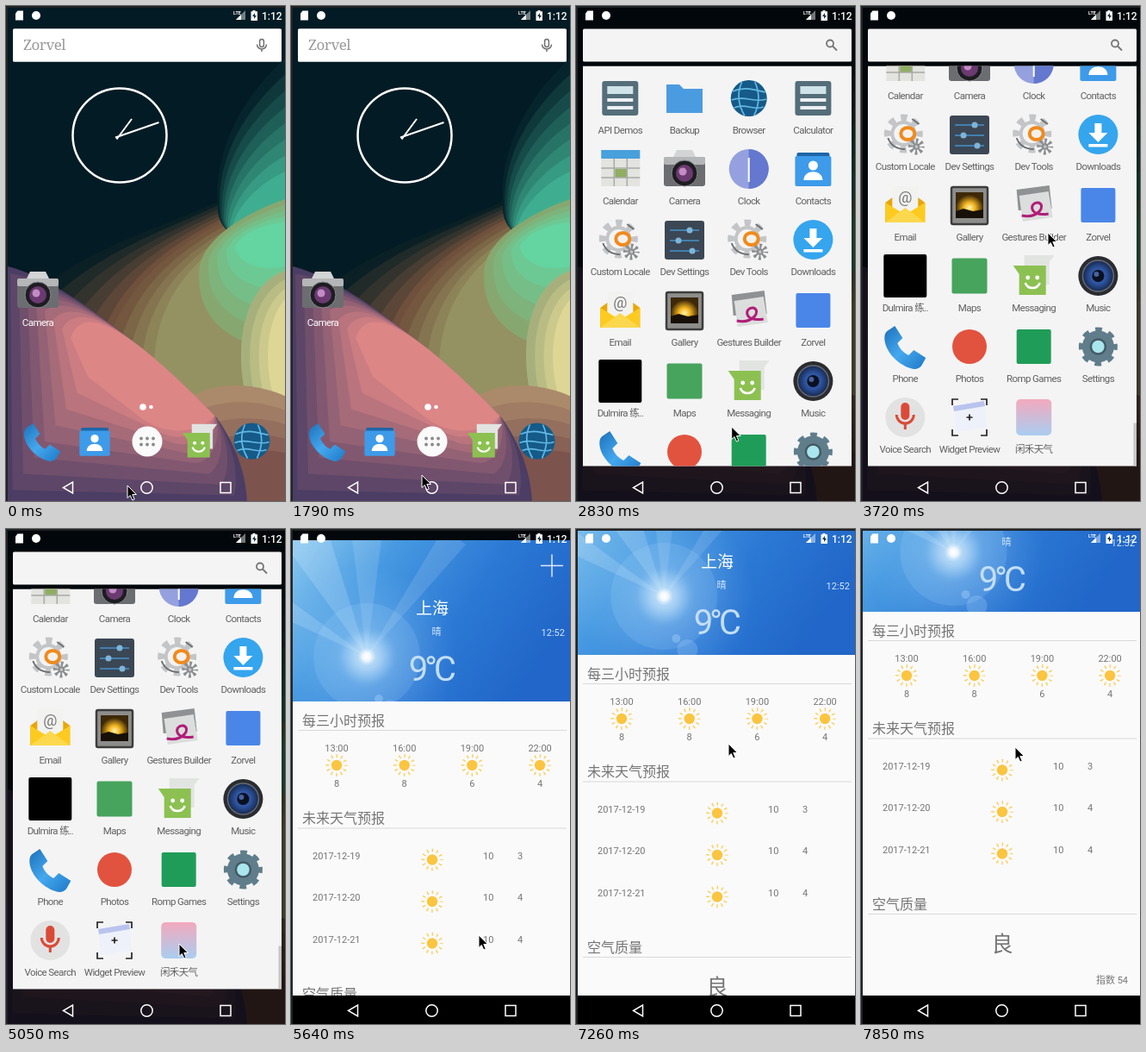
Recreate the animation shown at these times as an HTML page. Size 324 by 574 pixels, loop 7.99 s.

```html
<!DOCTYPE html>
<html lang="zh-CN">
<head>
<meta charset="utf-8">
<title>Weather app demo</title>
<style>
html, body { margin: 0; width: 100%; height: 100%; overflow: hidden; background: #031b24; }
svg { display: block; width: 100vw; height: 100vh; }
text { font-family: Roboto, "Noto Sans CJK SC", "Noto Sans CJK", sans-serif; }
.label { font-size: 11.5px; letter-spacing: -.6px; text-anchor: middle; }
.line { fill: none; stroke: #fff; }
</style>
</head>
<body>
<svg viewBox="0 0 324 574" preserveAspectRatio="none">
  <defs>
    <linearGradient id="sky" x1="0" y1=".1" x2="1" y2=".5">
      <stop offset="0" stop-color="#85c5ef"/><stop offset=".3" stop-color="#4699e1"/>
      <stop offset=".65" stop-color="#2b78d4"/><stop offset="1" stop-color="#2166c8"/>
    </linearGradient>
    <radialGradient id="glow">
      <stop offset="0" stop-color="#fff"/><stop offset=".13" stop-color="#fff" stop-opacity=".85"/>
      <stop offset=".3" stop-color="#c5e8ff" stop-opacity=".45"/><stop offset="1" stop-color="#9fd4fb" stop-opacity="0"/>
    </radialGradient>
    <radialGradient id="sunset" cy=".6">
      <stop offset="0" stop-color="#fff6b0"/><stop offset=".4" stop-color="#f2b521"/><stop offset="1" stop-color="#3d2807"/>
    </radialGradient>
    <linearGradient id="dusk" x2="0" y2="1">
      <stop offset="0" stop-color="#f3a9bd"/><stop offset="1" stop-color="#a9cdf0"/>
    </linearGradient>
    <linearGradient id="handset" x2="1" y2="1">
      <stop offset="0" stop-color="#1c70b8"/><stop offset=".5" stop-color="#45a8ef"/><stop offset="1" stop-color="#1d78c6"/>
    </linearGradient>
    <radialGradient id="cone">
      <stop offset="0" stop-color="#0c1430"/><stop offset=".45" stop-color="#3159a8"/><stop offset="1" stop-color="#16284f"/>
    </radialGradient>
    <clipPath id="panelBox"><rect x="8" y="69.5" width="312" height="464"/></clipPath>
    <clipPath id="reveal"><circle id="hole" cx="163.5"/></clipPath>
    <clipPath id="appBox"><rect x="2" y="2" width="322" height="539"/></clipPath>
    <clipPath id="skyBox"><rect x="2" width="322" height="187"/></clipPath>
  </defs>

  <rect width="324" height="574" fill="#031b24"/>
  <g id="wall"></g>
  <rect id="dim" width="324" height="574"/>

  <g id="home"></g>

  <rect x="8" y="26.5" width="312" height="38" rx="1.5" fill="#f4f4f4"/>
  <g id="brand">
    <rect x="8" y="26.5" width="312" height="38" rx="1.5" fill="#fff"/>
    <text x="20" y="51" font-size="17" fill="#9a9a9a" style="font-family:'Noto Serif','Liberation Serif',serif;letter-spacing:-.5px">Zorvel</text>
    <g fill="none" stroke="#707070" stroke-width="1.5">
      <rect x="294.6" y="38.5" width="4.8" height="9" rx="2.4"/><path d="M291.5 44.5a5.5 5.5 0 0 0 11 0M297 50v3"/>
    </g>
  </g>
  <g id="lens" fill="none" stroke="#757575" stroke-width="1.8"><circle cx="295" cy="43.5" r="4"/><path d="M298 46.5l5 5"/></g>

  <g clip-path="url(#panelBox)"><g clip-path="url(#reveal)">
    <rect id="panel" x="8" width="312" height="465" fill="#f4f4f4"/>
    <g id="list"></g>
    <rect id="thumb" x="316.5" width="3.5" height="50" fill="#c6c6c6"/>
  </g></g>

  <g id="app">
    <rect y="540" width="324" height="34"/>
    <g clip-path="url(#appBox)"><g id="page">
      <rect y="187" width="324" height="640" fill="#fafafa"/>
      <g clip-path="url(#skyBox)">
        <rect width="324" height="187" fill="url(#sky)"/>
        <g id="flare">
          <path fill="#fff" opacity=".16" d="M0 0L-110-150-50-160zM0 0L-130-60-130-95z"/>
          <path fill="#fff" opacity=".12" d="M0 0L-20-160 20-160zM0 0L90-150 115-130z"/>
          <circle r="105" fill="url(#glow)" opacity=".55"/>
          <circle r="62" fill="#bfe4ff" opacity=".13"/>
          <circle r="36" fill="url(#glow)"/>
          <circle cx="14" cy="49" r="5" fill="#bfe4ff" opacity=".3"/>
          <circle cx="27" cy="62" r="12" fill="#bfe4ff" opacity=".22"/>
        </g>
      </g>
      <path class="line" opacity=".85" stroke-width="1.5" d="M290 29.5h26M303 16.5v26"/>
      <g id="report"></g>
    </g></g>
  </g>

  <g fill="#fff">
    <path d="M13.5 5.5h6.5v11h-9v-8z"/>
    <circle cx="35" cy="11" r="5"/>
    <path d="M278 5v11h-11z" opacity=".45"/><path d="M273 10v6h-6z"/>
    <text x="264" y="10" font-size="5.5" font-weight="700">LTE</text>
    <path d="M286.5 5h3v1.3h2.5v10.7h-7.5v-10.7h2z"/>
    <path d="M289 8l-3 4h2v3l3-4h-2z" fill="#17303f"/>
    <text x="297" y="15.5" font-size="12" font-weight="500">1:12</text>
  </g>
  <g class="line" stroke-width="1.5">
    <path d="M77.5 552v13L66.5 558.5z"/><circle cx="163.5" cy="558.5" r="6.7"/><rect x="249" y="552.5" width="12" height="12"/>
  </g>
  <path d="M0 0H324V2H2V574H0z" fill="#202326"/>
  <path id="cursor" d="M0 0V14.5l3.3-3 2.5 5.5 2.4-1-2.4-5.5H10.5z" fill="#000" stroke="#fff"/>
</svg>

<script>
const $ = id => document.getElementById(id);
const mix = (a, b, p) => a + (b - a) * p;
const circle = (x, y, r, fill, more = '') => `<circle cx="${x}" cy="${y}" r="${r}" fill="${fill}" ${more}/>`;
const rect = (x, y, w, h, fill, more = '') => `<rect x="${x}" y="${y}" width="${w}" height="${h}" fill="${fill}" ${more}/>`;
const path = (d, fill, more = '') => `<path d="${d}" fill="${fill}" ${more}/>`;
const stroke = (d, color, w) => path(d, 'none', `stroke="${color}" stroke-width="${w}"`);
const at = (x, y, art, scale = 1) => `<g transform="translate(${x} ${y}) scale(${scale})">${art}</g>`;
const label = (x, y, s, fill) => `<text class="label" x="${x}" y="${y + 4}" fill="${fill}">${s}</text>`;
const text = (x, y, s, size = 11, fill = '#757575', anchor = 'middle', more = '') =>
  `<text x="${x}" y="${y + size * .36}" font-size="${size}" fill="${fill}" text-anchor="${anchor}" ${more}>${s}</text>`;
const square = (size, fill) => rect(-size / 2, -size / 2, size, size, fill, 'rx="2"');

// Flat bands that blend one outline and colour into another
function bands(count, outer, outerColor, inner, innerColor) {
  const number = /-?\d+/g, target = inner.match(number);
  const rgb = hex => hex.match(/\w\w/g).map(h => parseInt(h, 16));
  const from = rgb(outerColor), to = rgb(innerColor);
  let art = '';
  for (let k = 0; k < count; k++) {
    const p = k / (count - 1);
    let i = 0;
    const d = outer.replace(number, v => mix(+v, +target[i++], p).toFixed(1));
    art += path(d, `rgb(${from.map((v, c) => Math.round(mix(v, to[c], p)))})`);
  }
  return art;
}
$('wall').innerHTML =
  bands(6, 'M 20 345 C 90 280 170 262 250 225 L 330 300 L 330 580 L 60 580 Z', '#0b2024',
    'M 105 400 C 125 325 185 278 255 245 L 330 300 L 330 580 L 150 580 Z', '#6f503c') +
  bands(5, 'M 115 400 C 135 325 190 282 256 248 L 330 300 L 330 580 L 150 580 Z', '#73573e',
    'M 172 410 C 176 345 210 300 262 268 L 330 300 L 330 580 L 200 580 Z', '#949262') +
  bands(8, 'M 330 55 C 280 100 240 160 246 235 C 246 250 255 262 270 270 L 330 270 Z', '#06242c',
    'M 330 190 C 300 200 268 230 262 258 C 262 268 270 275 280 275 L 330 275 Z', '#3fae90') +
  bands(5, 'M 225 300 C 235 262 290 235 330 222 L 330 400 C 290 400 215 380 225 300 Z', '#86a870',
    'M 266 278 C 275 262 300 252 330 250 L 330 300 C 300 310 268 300 266 278 Z', '#64d4a0') +
  bands(4, 'M 330 305 C 285 315 255 380 285 480 L 330 500 Z', '#a7b07c',
    'M 330 335 C 308 350 296 400 310 450 L 330 460 Z', '#ded695') +
  bands(5, 'M 190 470 C 240 425 300 440 330 455 L 330 580 L 190 580 Z', '#ab8a6b',
    'M 190 545 C 240 515 300 510 330 520 L 330 580 L 190 580 Z', '#7d534e') +
  bands(9, 'M -5 300 C 60 315 130 370 245 478 C 275 520 280 560 280 580 L -5 580 Z', '#4b3d63',
    'M 75 385 C 90 340 150 380 242 475 C 228 494 190 500 160 480 L 95 430 Z', '#dd8686');

// Ring of evenly spaced bars, used for gear teeth and sun rays
function spokes(r, count, len, share, color) {
  const step = 2 * Math.PI * r / count;
  return circle(0, 0, r, 'none', `stroke="${color}" stroke-width="${len}" stroke-dasharray="${step * share} ${step * (1 - share)}" stroke-dashoffset="${step * share / 2}"`);
}
const gear = (r, color, width) => spokes(r, 8, 9, .5, color) +
  circle(0, 0, r - 5, 'none', `stroke="${color}" stroke-width="${width}"`);
const sun = circle(0, 0, 6.2, '#fbc540') + spokes(10.8, 12, 4, .25, '#fbce5c');

const icons = {
  chart: rect(-21, -20, 42, 40, '#546e7a', 'rx="3"') + rect(-15, -14, 30, 9, '#cfe3e8') + stroke('M-15 2H15M-15 11H15', '#eceff1', 4),
  folder: path('M-21-16h15l5 5h22v28h-42z', '#4b9be0'),
  globe: circle(0, 0, 21, '#155a88') + stroke('M-19-8C-5-14 8-10 19-7M-20 2C-6-4 8 6 20 1M-17 11C-4 5 6 15 17 10M-8-19C-14-6-12 8-5 20M7-19C13-6 12 8 6 20', '#62b8e3', 1.7),
  calendar: rect(-22, -22, 45, 42, '#e3e3e0') + rect(-22, -22, 45, 10, '#48a0dc') + rect(-6, 0, 14, 10, '#90ae62') +
    stroke('M-22-1H23M-22 10H23M-7-12V20M8-12V20', '#a9aaa6', 1.5),
  camera: rect(-24, -14, 48, 34, '#6b6d70', 'rx="3"') + path('M-13-14l4-8H9l4 8z', '#d2d4d5') + rect(-24, -14, 48, 9, '#b4b6b8', 'rx="2"') +
    circle(0, 5, 15, '#1e1d22', 'stroke="#88898c"') + circle(0, 5, 10, '#6a3a70') + circle(-2, 3, 4.5, '#c38cc4'),
  clock: circle(0, 0, 23, '#94a1de') + path('M0-23A23 23 0 0 1 0 23z', '#6378ce') + stroke('M0-13V0V15', '#fff', 2),
  contacts: rect(-19, -19, 38, 9, '#1d66a8', 'rx="2"') + rect(-21, -15, 42, 35, '#3d9be9', 'rx="2"') + circle(0, -4, 5.5, '#fff') + path('M-11 13c0-13 22-13 22 0z', '#fff'),
  tool: at(-2, -1, gear(18, '#c3c5c7', 4)) + stroke('M-20 4C-17 12-10 17 0 17M8-18L16-12', '#6d6f71', 2) + at(13, 14, gear(9, '#8b8d8f', 3), .7) +
    `<ellipse cx="3" cy="-1" rx="8" ry="7" fill="#f4f1ec" stroke="#f08a1c" stroke-width="4"/>`,
  sliders: rect(-23, -22, 46, 45, '#3b4754', 'rx="3"') + stroke('M-17-11H17M-17 1H17M-17 13H17', '#4593cc', 1.6) +
    circle(6, -11, 3.5, '#7fb4d8') + circle(-7, 1, 3.5, '#7fb4d8') + circle(9, 13, 3.5, '#7fb4d8'),
  download: circle(0, 0, 23, '#35a5ee') + path('M-4-13h8v11h7L0 9-11-2h7z', '#fff') + rect(-11, 11, 22, 3.5, '#fff'),
  email: path('M-23-3L0-20 23-3V20H-23z', '#e8a60d') + rect(-15, -22, 30, 30, '#f2f2f0') + text(0, -9, '@', 18, '#777') +
    path('M-23-3L0 11 23-3V20H-23z', '#fdcb1f') + path('M-23 20L0 3 23 20z', '#fbd84e'),
  gallery: rect(-21, -21, 42, 43, '#8d8d8b', 'rx="2" stroke="#3c3c3c" stroke-width="2.5"') + rect(-16, -15, 32, 30, 'url(#sunset)') + path('M-16 7L-7 4 4 7 16 5V15H-16z', '#171008'),
  gesture: path('M-20-18L18-23 21 4-18 6z', '#8f9193') + path('M-17-11L17-16 22 14-13 19z', '#dcdddd') +
    stroke('M-14 12C5 16 15 0 5-3-5-4-7 14 17 10', '#b01d78', 3),
  envelope: square(40, '#4a86e8'),
  dark: square(50, '#000'),
  map: square(41, '#47a45c'),
  message: path('M-11-24H24L18-16V10H-11z', '#e2e4e2') + path('M-24-12H14V22H-17V-2z', '#8cc152') +
    circle(-7, 2, 2.4, '#fff') + circle(4, 2, 2.4, '#fff') + stroke('M-10 8C-7 16 4 16 7 8', '#fff', 2.6),
  music: circle(0, 0, 23, '#2b2c30') + circle(0, 0, 18, 'url(#cone)', 'stroke="#666a72" stroke-width="1.5"') + circle(0, 0, 7, '#0b1020') + circle(-2, -2, 3, '#47639f'),
  phone: path('M-21-18l9-6 9 14-6 6c3 7 7 11 13 14l6-6 14 9-5 9c-3 4-8 5-13 3C-10 20-24 4-24-10c0-4 1-6 3-8z', 'url(#handset)'),
  photos: circle(0, 0, 20, '#e2533f'),
  games: square(40, '#1f9d58'),
  settings: gear(18, '#607d8b', 11) + circle(0, 0, 8.5, '#a9e6ee', 'stroke="#455a64" stroke-width="2.5"'),
  voice: circle(0, 0, 23, '#e2e2e2') + rect(-5, -17, 10, 20, '#d94a38', 'rx="5"') + stroke('M-10-3a10 10 0 0 0 20 0M0 7V14', '#d94a38', 3),
  widget: path('M-19-13L17-19 20 12-16 17z', '#eef1fa') + path('M-19-13L17-19 18-13-18-7z', '#b9c4ee') +
    stroke('M-20-14V-21H-13M13-21H20V-14M20 14V21H13M-13 21H-20V14M-3.5 0H3.5M0-3.5V3.5', '#222', 1.7),
  weather: rect(-20.5, -21, 41, 42, 'url(#dusk)', 'rx="5"'),
};

const apps = [
  ['chart', 'API Demos'], ['folder', 'Backup'], ['globe', 'Browser'], ['chart', 'Calculator'],
  ['calendar', 'Calendar'], ['camera', 'Camera'], ['clock', 'Clock'], ['contacts', 'Contacts'],
  ['tool', 'Custom Locale'], ['sliders', 'Dev Settings'], ['tool', 'Dev Tools'], ['download', 'Downloads'],
  ['email', 'Email'], ['gallery', 'Gallery'], ['gesture', 'Gestures Builder'], ['envelope', 'Zorvel'],
  ['dark', 'Dulmira 练..'], ['map', 'Maps'], ['message', 'Messaging'], ['music', 'Music'],
  ['phone', 'Phone'], ['photos', 'Photos'], ['games', 'Romp Games'], ['settings', 'Settings'],
  ['voice', 'Voice Search'], ['widget', 'Widget Preview'], ['weather', '闲禾天气'],
];
$('list').innerHTML = apps.map(([icon, name], i) => {
  const x = 51.3 + i % 4 * 74.7, y = 107 + Math.floor(i / 4) * 82;
  return at(x, y, icons[icon]) + label(x, y + 37, name, '#606060');
}).join('');

const dots = [0, 1, 2, 3, 4, 5].map(i => circle(i % 3 * 7 - 7, i < 3 ? -3.5 : 3.5, 1.9, '#8a8a8a')).join('');
$('home').innerHTML =
  circle(132, 150, 54.5, 'none', 'class="line" stroke-width="2.5"') + stroke('M128.5 154.5L146 131M127 152.5L177.5 135', '#fff', 2) +
  at(37, 330, icons.camera) + label(37, 367, 'Camera', '#fff') +
  circle(159, 465, 3.8, '#fff') + circle(168.5, 465, 2.3, '#fff') +
  at(42, 505, icons.phone, .88) + at(103, 505, icons.contacts, .84) +
  at(164, 505, circle(0, 0, 17.5, '#fafafa') + dots) +
  at(225, 505, icons.message, .84) + at(285.5, 504.5, icons.globe);

// Positions are measured from the top of the page; the sky is 187 high
const sky = 187;
const rule = y => rect(8, sky + y, 312, 1, '#d9d9d9');
const title = (y, s) => text(13, sky + y, s, 16, '#757575', 'start') + rule(y + 11);
const hours = [['13:00', 8], ['16:00', 8], ['19:00', 6], ['22:00', 4]];
const days = [['2017-12-19', 3], ['2017-12-20', 4], ['2017-12-21', 4]];
$('report').innerHTML =
  text(164, sky - 108, '上海', 19, '#fff') + text(169, sky - 81, '晴', 11, '#d5e8fa') +
  text(318, sky - 80, '12:52', 11, '#d5e8fa', 'end') +
  text(163, sky - 38, '9℃', 40, '#c3def7', 'middle', 'letter-spacing="-2.5"') +
  title(22, '每三小时预报') +
  hours.map(([time, temp], i) => {
    const x = 53 + i * 78.7;
    return text(x, sky + 54, time) + at(x, sky + 74, sun) + text(x, sky + 95, temp);
  }).join('') +
  title(135.5, '未来天气预报') +
  days.map(([date, low], i) => {
    const y = sky + 179 + i * 48.5;
    return text(25, y, date, 11, '#757575', 'start') + at(164, y + 4.5, sun) +
      text(223, y, 10, 11, '#757575', 'start') + text(263, y, low, 11, '#757575', 'start');
  }).join('') +
  title(339, '空气质量') + text(164, sky + 384.5, '良', 25) +
  text(310, sky + 427, '指数 54', 11, '#757575', 'end');

// Linear value between [step, value] keys
function track(n, ...keys) {
  const i = keys.findIndex(k => k[0] > n);
  if (i === 0) return keys[0][1];
  if (i < 0) return keys[keys.length - 1][1];
  const [a, va] = keys[i - 1], [b, vb] = keys[i];
  return mix(va, vb, (n - a) / (b - a));
}
const set = (id, name, value) => $(id).setAttribute(name, value);
const move = (id, x, y) => set(id, 'transform', `translate(${x} ${y})`);
const show = (id, value) => set(id, 'opacity', value);

const LOOP = 7990, FIRST = 140, STEP = 148.27;

function draw(t) {
  const n = t < FIRST ? 0 : Math.floor((t - FIRST + 8) / STEP) + 1;

  show('home', track(n, [13, 1], [17, .04], [18, 0]));
  show('dim', track(n, [13, 0], [17, .55], [19, .73]));
  show('brand', track(n, [15, 1], [17, .6], [18, 0]));
  show('lens', track(n, [15, 0], [17, .5], [18, 1]));

  const rise = track(n, [13, 200], [17, 38], [18, 0]);
  set('hole', 'r', track(n, [13, 0], [17, 234], [18, 290]));
  set('hole', 'cy', 302 + rise);
  set('panel', 'y', 69.5 + rise);
  show('list', track(n, [17, 0], [19, 1]));
  const drag = track(n, [21, 0], [24, 122]);
  move('list', 0, -drag);
  set('thumb', 'y', 70 + 413.5 * drag / 122);
  show('thumb', drag > 0 ? 1 : 0);

  const slide = track(n, [35, 34], [38, 11], [40, 0]);
  const scroll = track(n, [47, 0], [49, 43], [51, 93]);
  show('app', track(n, [35, 0], [38, 1]));
  move('page', 0, 2 + slide - scroll);
  move('flare', 88 + (n - 38) * 1.3, Math.max(118, 135 - (n - 38) * 1.45));

  show('cursor', n > 0 && n < 11 ? 0 : 1);
  const x = track(n, [0, 141], [11, 146], [14, 164], [18, 164], [21, 214], [25, 217], [27, 216], [32, 201], [35, 201], [38, 218], [42, 218], [47, 177], [49, 177], [53, 179]);
  const y = track(n, [0, 556], [11, 560], [14, 512], [18, 512], [21, 440], [25, 263], [27, 250], [32, 481], [35, 481], [38, 471], [42, 471], [47, 292], [49, 249], [53, 253]);
  move('cursor', x, y);
}

let start;
function tick(now) {
  start ??= now;
  draw((now - start) % LOOP);
  requestAnimationFrame(tick);
}
draw(0);
requestAnimationFrame(tick);
</script>
</body>
</html>
```
